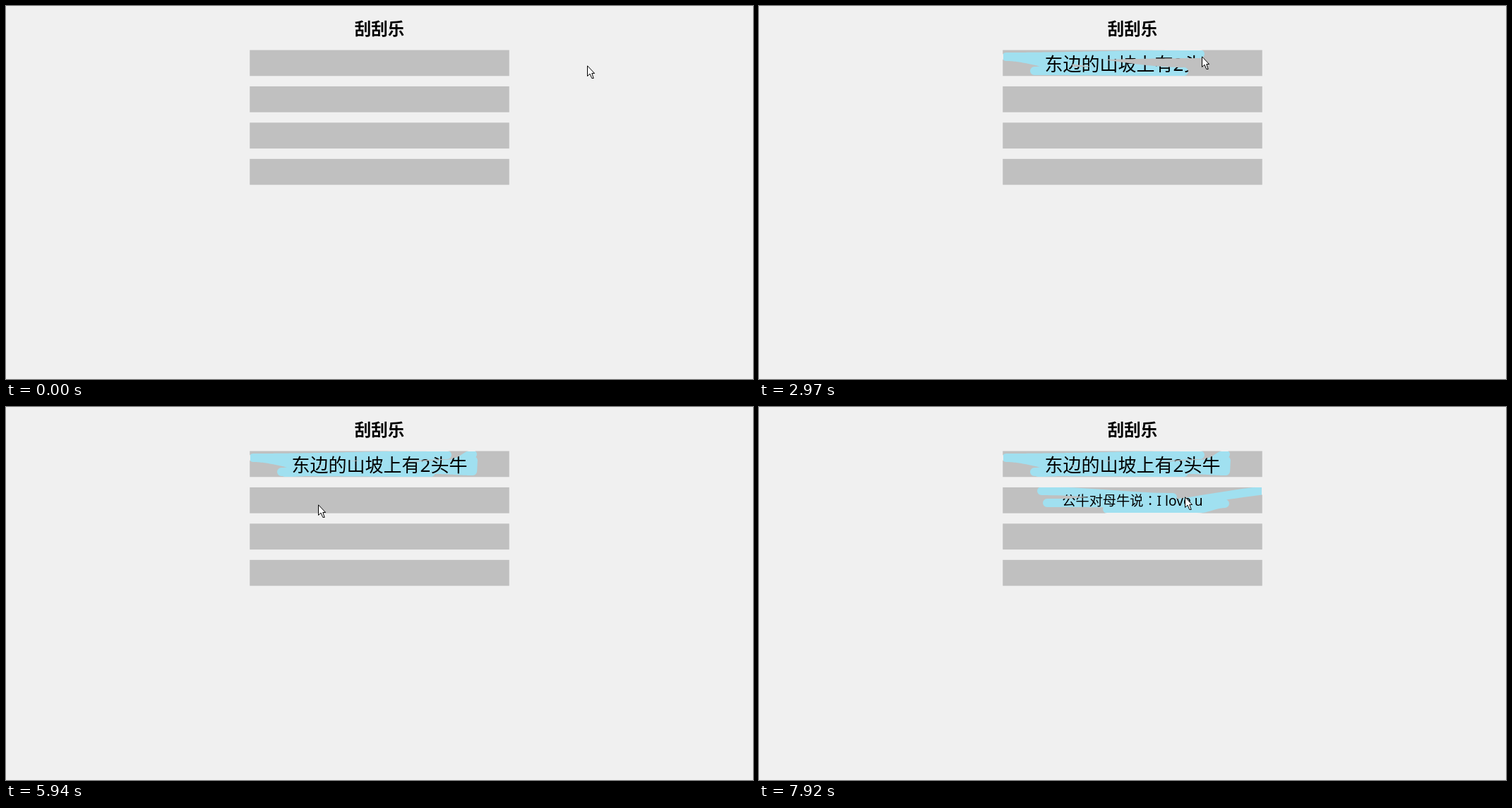
An HTML page with a canvas that plays this animation: 1058 px wide and 529 px high, repeating every 8000 ms.

```html
<!DOCTYPE html>
<html lang="zh-CN">
<head>
<meta charset="utf-8">
<title>刮刮乐</title>
<style>
  html, body { margin: 0; width: 100%; height: 100%; overflow: hidden; background: #f0f0f0; }
  body { position: relative; color: #000; font-family: "Noto Sans", "Noto Sans CJK SC", sans-serif; }
  canvas, svg, h1, p { position: absolute; left: 0; top: 0; margin: 0; }
  h1 { width: 1058px; top: 11px; font: bold 23.5px/40px "Noto Sans CJK SC", sans-serif; text-align: center; }
  p { left: 346px; width: 366px; line-height: 38px; background: #a0e0f0; text-align: center; white-space: nowrap; overflow: hidden; }
  #first { top: 63px; height: 36px; font-size: 26px; }
  #second { top: 114px; height: 36px; font-size: 19.2px; }
  p span { font-family: "Noto Sans CJK TC", sans-serif; line-height: 0; }
</style>
</head>
<body>
<h1>刮刮乐</h1>
<p id="first">东边的山坡上有2头牛</p>
<p id="second">公牛对母牛说<span lang="zh-TW">：</span>I love u</p>
<canvas width="1058" height="529"></canvas>
<svg id="cursor" width="12" height="20">
  <path d="M.5 .8V15.5L4 12.2L6.8 18.5H9.2L6.8 11.5H10.6Z" fill="#fff" stroke="#000"/>
</svg>
<script>
const LOOP = 8000, STEP = 330;
const ctx = document.querySelector('canvas').getContext('2d');
const cursor = document.getElementById('cursor');

// Turning points of the hand: time in steps, x, y
const turns = [
  [0, 821, 81], [3, 386, 73], [4, 602, 93], [5, 390, 92], [6, 438, 85],
  [7, 350, 72], [9, 625, 68], [10, 395, 93], [11, 521, 86], [13, 653, 80],
  [14, 609, 89], [15, 661, 91], [15.5, 662, 76], [16, 636, 78], [17, 661, 67],
  [18, 440, 135], [19, 400, 119], [19.5, 586, 128], [20, 408, 136],
  [21, 660, 137], [21.2, 620, 145], [21.4, 493, 145], [22, 781, 114],
  [23, 566, 138], [24, 601, 124]
];
// Spans during which the button is held
const presses = [[3, 12.7], [13, 17], [19, 19.9], [20, 22]];

const easeOut = u => 1 - (1 - u) ** 4;
const smooth = u => u * u * (3 - 2 * u);
const mix = (a, b, u) => a + (b - a) * u;
const pressed = t => presses.some(([down, up]) => t >= down && t < up);

// Scratching sweeps evenly in x and bends in y; free moves slow down at the end
function hand(t) {
  const next = Math.max(1, turns.findIndex(turn => turn[0] >= t));
  const [t0, x0, y0] = turns[next - 1], [t1, x1, y1] = turns[next];
  const u = (t - t0) / (t1 - t0);
  return [mix(x0, x1, pressed(t0) ? u : easeOut(u)), mix(y0, y1, smooth(u))];
}

function drawCards() {
  ctx.globalCompositeOperation = 'source-over';
  ctx.fillStyle = '#c0c0c0';
  for (let i = 0; i < 4; i++) ctx.fillRect(345.25, 62.5 + 51.45 * i, 367.5, 36.75);
}

function scratch(step) {
  ctx.globalCompositeOperation = 'destination-out';
  ctx.lineWidth = 12;
  ctx.lineCap = ctx.lineJoin = 'round';
  for (const [down, up] of presses) {
    if (step < down) break;
    const end = Math.min(step, up);
    ctx.beginPath();
    ctx.moveTo(...hand(down));
    for (let t = down; t < end; t += 0.02) ctx.lineTo(...hand(t));
    ctx.lineTo(...hand(end));
    ctx.stroke();
  }
}

function render(step) {
  ctx.clearRect(0, 0, 1058, 529);
  drawCards();
  scratch(step);
  const [x, y] = hand(step);
  cursor.style.transform = `translate(${Math.round(x + 2)}px, ${Math.round(y + 3)}px)`;
}

let shown = -1;
function tick() {
  const step = Math.floor(performance.now() % LOOP / STEP);
  if (step !== shown) render(shown = step);
  requestAnimationFrame(tick);
}
tick();
</script>
</body>
</html>
```
